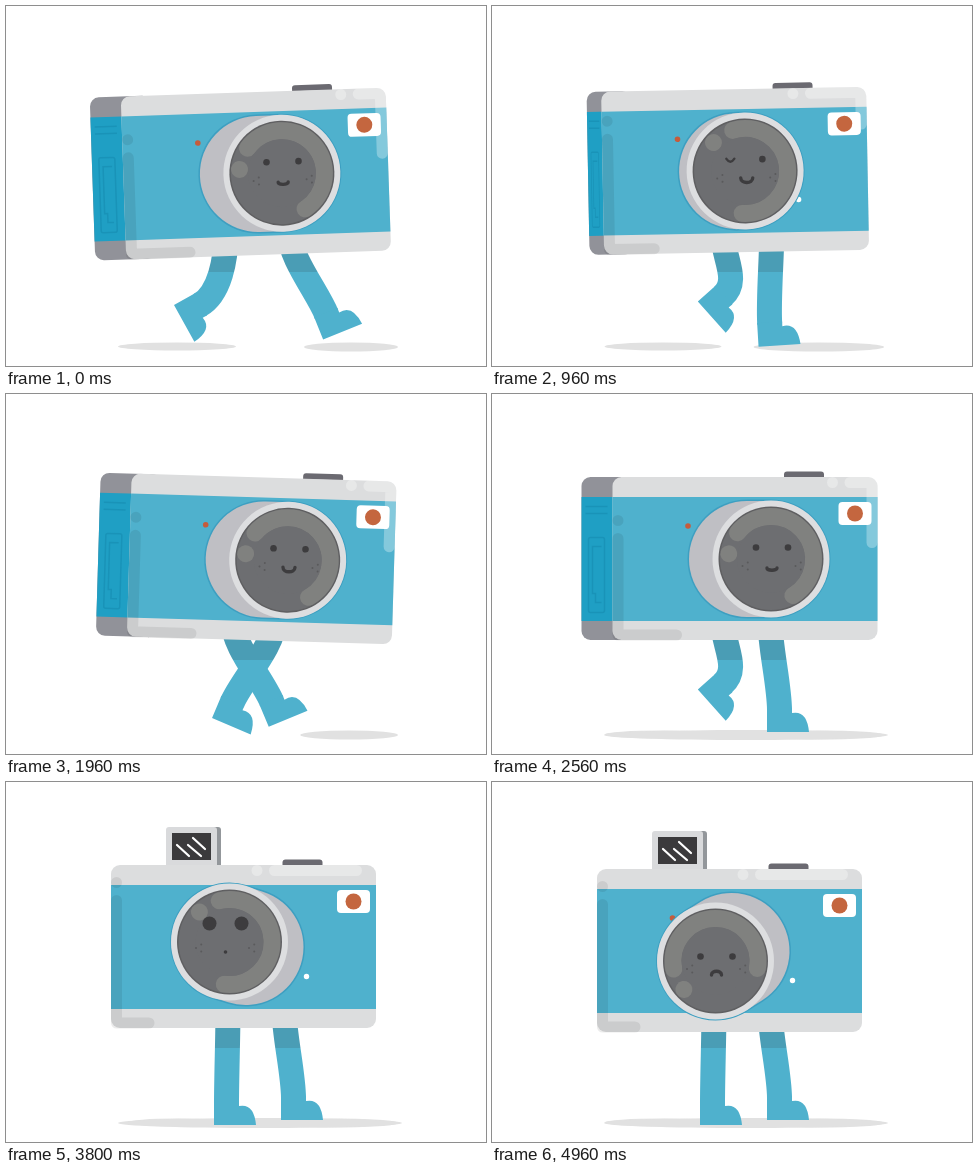
An HTML page that plays this animation: 480 px wide and 360 px high, repeating every 5 s.

```html
<!DOCTYPE html>
<html lang="en">
<head>
<meta charset="utf-8">
<title>Walking camera</title>
<style>
html, body { margin: 0; width: 100%; height: 100%; overflow: hidden; background: #fff; }
svg { display: block; width: 100vw; height: 100vh; }
</style>
</head>
<body>
<svg viewBox="0 0 480 360">
  <defs>
    <linearGradient id="legFill" gradientUnits="userSpaceOnUse" x1="0" y1="166" x2="0" y2="366">
      <stop offset=".5" stop-color="#4a9db5"/>
      <stop offset=".5" stop-color="#4fb1cd"/>
    </linearGradient>
    <path id="boot" d="M0 0V-24H25V-19Q40-22 42 0Z" fill="#4fb1cd"/>
  </defs>
  <g fill="#e1e1e1">
    <ellipse id="shadowL" cx="171" cy="340.5" ry="4"/>
    <ellipse id="shadowR" cy="341" ry="4.5"/>
    <ellipse id="shadowAll" cx="254" cy="341" rx="142" ry="5"/>
  </g>
  <g fill="none" stroke="url(#legFill)" stroke-width="25">
    <path id="legR"/>
    <path id="legL"/>
  </g>
  <use id="footR" href="#boot"/>
  <use id="footL" href="#boot"/>
  <g id="body">
    <g id="flash">
      <rect x="10" width="45" height="75" rx="3" fill="#93979b"/>
      <rect width="51" height="75" rx="3" fill="#d9dadc"/>
      <rect x="6" y="6" width="39" height="27" fill="#3b3a3c"/>
      <path d="M11 18L23 29M22 18L35 29M27 11L39 22" stroke="#fff" stroke-width="2.2" stroke-linecap="round"/>
    </g>
    <g id="side">
      <rect id="sideBase" y="-81.5" height="163" rx="9" fill="#919299"/>
      <rect id="sideBlue" y="-61.5" height="124" fill="#1f9fc4"/>
      <g id="panel" fill="none" stroke="#178eb3" stroke-width="1.5" opacity=".7">
        <path d="M4-52H26M4-45H26"/>
        <rect x="7" y="-21" width="16" height="75" rx="2"/>
        <path d="M20-12H11V35H14V44H20"/>
      </g>
    </g>
    <g id="front">
      <path d="M39-81V-84Q39-87 42-87H76Q79-87 79-84V-81Z" fill="#6b6a71"/>
      <rect x="-132.5" y="-81.5" width="265" height="163" rx="9" fill="#dcddde"/>
      <rect x="-132.5" y="-61.5" width="265" height="124" fill="#4fb1cd"/>
      <g fill="none" stroke-width="11" stroke-linecap="round" stroke-linejoin="round">
        <path id="shine" d="M-100-76H127V76" stroke="#fff" stroke-opacity=".3"/>
        <path id="shade" d="M-127-76V76.5H120" stroke="#000" stroke-opacity=".08"/>
      </g>
      <rect x="93.5" y="-56.5" width="33" height="23" rx="4" fill="#fff"/>
      <circle cx="110" cy="-45" r="8" fill="#c4663f"/>
      <circle cx="-57" cy="-32.5" r="2.8" fill="#c55c3c"/>
      <circle cx="63" cy="30" r="2.7" fill="#fff"/>
      <g stroke-linecap="round">
        <path id="rim" stroke="#3d9fc1" stroke-width="119"/>
        <path id="barrel" stroke="#bfbfc4" stroke-width="116"/>
      </g>
      <g id="lens">
        <circle r="58.5" fill="#dddee0"/>
        <circle r="52.5" fill="#5f5f61"/>
        <circle r="51" fill="#6d6e71"/>
        <g id="gloss" fill="none" stroke="#80817f" stroke-width="17" stroke-linecap="round">
          <path id="arc"/>
          <circle id="spot" r="8.5" fill="#80817f" stroke="none"/>
        </g>
        <circle r="34" fill="#6d6e71"/>
        <g id="dots" fill="#5a5a5c"></g>
        <g fill="#3d3c3e">
          <circle id="eyeL"/>
          <circle id="eyeR"/>
        </g>
        <g fill="none" stroke="#3d3c3e" stroke-linecap="round">
          <path id="wink" d="M-4-1Q0 5 4-1" stroke-width="2.4"/>
          <path id="mouth" stroke-width="3.4"/>
        </g>
      </g>
    </g>
  </g>
</svg>
<script>
const LOOP = 5000, STEP = 800, RAD = Math.PI / 180, TAU = 2 * Math.PI;
const el = {};
document.querySelectorAll('[id]').forEach(e => el[e.id] = e);

function set(id, attrs) {
  for (const k in attrs) el[id].setAttribute(k, attrs[k]);
}
const show = on => on ? 'visible' : 'hidden';
const move = (x, y) => `translate(${x} ${y})`;
const mix = (a, b, u) => a + (b - a) * u;
const clamp = u => Math.min(1, Math.max(0, u));
function ramp(t, from, to) {
  const u = clamp((t - from) / (to - from));
  return u * u * (3 - 2 * u);
}

// Key poses of one stride, relative to the left hip.
const POSES = [
  { at: 0, x: 168, y: 299, rot: 61, hip: 220 },
  { at: .25, x: 210, y: 295, rot: 47, hip: 232 },
  { at: .46, x: 263, y: 333, rot: -23, hip: 227 },
  { at: .78, x: 200, y: 342, rot: 0, hip: 222 },
  { at: .95, x: 149, y: 324, rot: 23, hip: 211 }
];
const STAND = { L: { x: 208, y: 343, rot: 0, hip: 222 }, R: { x: 275, y: 338, rot: 0, hip: 278 } };

function blend(a, b, u) {
  const p = {};
  for (const k of ['x', 'y', 'rot', 'hip']) p[k] = mix(a[k], b[k], u);
  return p;
}

function stride(phase) {
  const i = POSES.findLastIndex(p => p.at <= phase);
  const a = POSES[i], b = POSES[(i + 1) % POSES.length];
  return blend(a, b, ramp(phase, a.at, b.at || 1));
}

function drawLeg(side, phase, dx, rest) {
  const step = stride(phase % 1);
  step.x += dx;
  step.hip += dx;
  const { x, y, rot, hip } = blend(step, STAND[side], rest);
  const c = Math.cos(rot * RAD), s = Math.sin(rot * RAD);
  const at = (px, py) => `${x + px * c - py * s} ${y + px * s + py * c}`;
  set('leg' + side, { d: `M${hip} 228C${hip} 252 ${at(12.5, -46)} ${at(12.5, -22)}` });
  set('foot' + side, { transform: `${move(x, y)} rotate(${rot})` });
}

function drawShadows(phase, rest) {
  set('shadowL', { rx: 59 * clamp(1.6 * Math.abs(Math.cos(Math.PI * phase)) - .3) });
  const from = 278 + 20 * Math.cos(2 * TAU * phase);
  set('shadowR', { cx: (from + 392) / 2, rx: (392 - from) / 2 });
  set('shadowAll', { opacity: rest });
}

function drawCase(depth, pop, popped) {
  const mid = depth / 2, turn = depth / 31;
  set('front', { transform: move(mid, 0) });
  set('side', { transform: move(-132.5 - mid, 0), visibility: show(depth > .3) });
  set('sideBase', { width: depth + 30 });
  set('sideBlue', { width: depth + 8 });
  set('panel', { transform: `scale(${Math.max(turn, .01)} 1)` });
  set('flash', { transform: move(mid - 77.5, -81.5 - pop), visibility: show(popped) });
  // Each highlight is a dot and a bar sliding round a corner.
  const slide = 31 + 118 * turn - 44 * turn * turn;
  set('shine', { 'stroke-dasharray': '0 17.5 82 999', 'stroke-dashoffset': -(slide + 82.5) });
  set('shade', { 'stroke-dasharray': '0 18 155 999', 'stroke-dashoffset': -(12 + 26 * turn) });
}

function drawLens(x, y, gloss) {
  const tube = `M2 .5L${x + 2} ${y + .5}`;
  set('rim', { d: tube });
  set('barrel', { d: tube });
  set('lens', { transform: move(x + 2, y + .5) });
  set('gloss', { transform: `rotate(${gloss})` });
}

function drawFace(grin, shock, sad, wink) {
  const x = 1 + .5 * grin - 5 * shock, y = 7 * (sad - shock) - 11.5, r = 3.3 + 3.7 * shock;
  set('eyeL', { cx: x - 16, cy: y, r: wink ? 0 : r });
  set('eyeR', { cx: x + 16, cy: y, r });
  set('wink', { transform: move(x - 16, y), visibility: show(wink) });
  set('dots', { transform: move(x - 1, sad - shock) });
  const w = 10 + 2 * grin - 9.8 * shock, bend = 3 + 3 * grin - 3 * shock - 8 * sad;
  const top = 9 - 2 * grin + shock + 5 * sad;
  set('mouth', { d: `M${x - w / 2} ${top}c0 ${bend} ${w} ${bend} ${w} 0` });
}

function draw(t) {
  const phase = t / STEP % 1;
  const walk = 1 - ramp(t, 2440, 2560);
  const glance = ramp(t, 600, 770) - ramp(t, 1680, 1880);
  const grin = ramp(t, 600, 900) - ramp(t, 2100, 2400);
  const front = ramp(t, 2600, 2860);
  const sad = ramp(t, 3900, 4200);
  const shock = ramp(t, 2700, 2960) - sad;

  drawLeg('R', phase + .5, 57, 1 - walk);
  drawLeg('L', phase, 0, ramp(t, 2600, 2760));
  drawShadows(phase, 1 - walk);

  const rot = -2 * Math.cos(TAU * (phase - .04)) * walk;
  const bob = 6.5 * Math.max(0, Math.cos(2 * TAU * (phase - .08))) * walk;
  const hop = 18 * Math.sin(Math.PI * clamp((t - 2860) / 250));
  const sigh = 4 * sad * Math.cos(Math.PI * (t - 4960) / 680) ** 2;
  set('body', { transform: `${move(237.5 + rot * 1.6, 164.5 + bob - hop + sigh)} rotate(${rot})` });

  const since = Math.max(0, t - 2860);
  const pop = 38 * (1 - Math.exp(-since / 130) * Math.cos(since / 40));
  drawCase(31 * (1 - .53 * glance) * (1 - front), pop, since > 0);
  drawLens(24 - 16 * glance - 40 * front, 15 * sad - 5 * front, 218 + 36 * glance + 38 * front - 87 * sad);
  drawFace(grin, shock, sad, t > 860 && t < 1200);
}

function setup() {
  const polar = deg => [42.5 * Math.cos(deg * RAD), 42.5 * Math.sin(deg * RAD)];
  set('arc', { d: `M${polar(0)}A42.5 42.5 0 1 1 ${polar(201)}` });
  const [cx, cy] = polar(-31);
  set('spot', { cx, cy });
  // Three freckles on each cheek.
  for (let i = 0; i < 6; i++) {
    const cheek = i < 3 ? -25 : 28, a = i * TAU / 3 + Math.PI;
    const dot = document.createElementNS('http://www.w3.org/2000/svg', 'circle');
    dot.setAttribute('cx', cheek + 3.5 * Math.cos(a));
    dot.setAttribute('cy', 7 + 4 * Math.sin(a));
    dot.setAttribute('r', 1);
    el.dots.append(dot);
  }
}

function tick(now) {
  draw(now % LOOP);
  requestAnimationFrame(tick);
}
setup();
draw(0);
requestAnimationFrame(tick);
</script>
</body>
</html>
```
